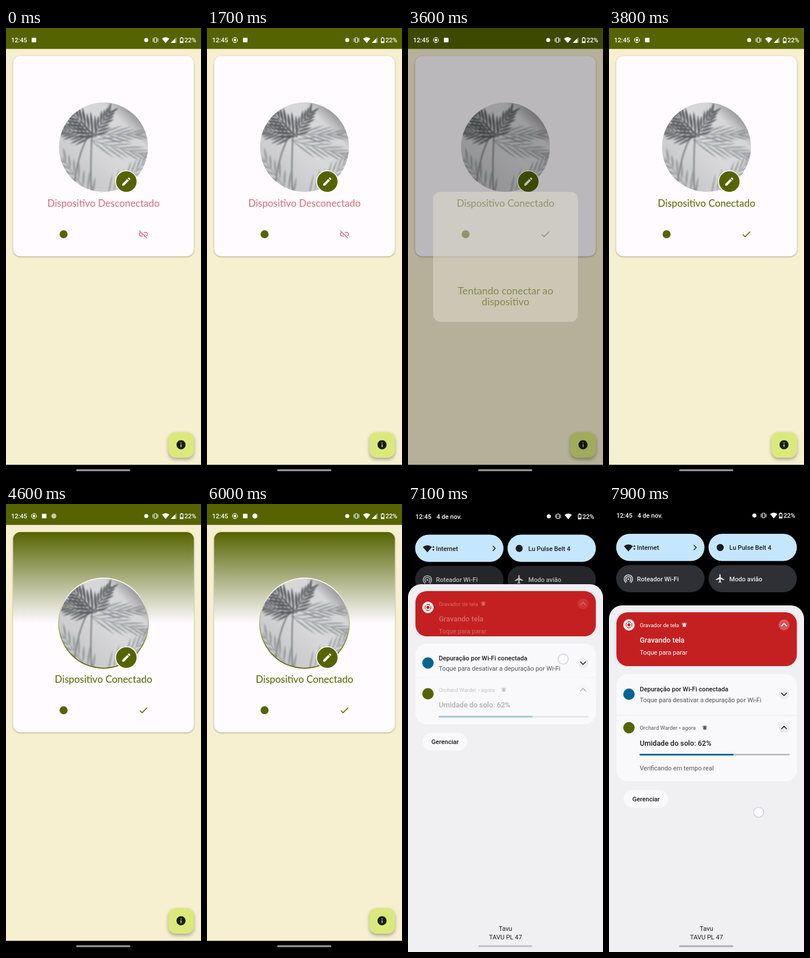
An HTML page for the animation above (8000 ms loop, 342 by 782 pixels).

```html
<!DOCTYPE html>
<html lang="pt-BR">
<head>
<meta charset="utf-8">
<title>Dispositivo</title>
<style>
  html, body { margin: 0; width: 100%; height: 100%; overflow: hidden; background: #000; }
  svg { display: block; }
  #stage { width: 342px; height: 782px; }
  text { font: 11.08px Roboto, sans-serif; white-space: pre; }
  .m { font-weight: 500; }
  .s { font-size: 9.5px; }
  .b { font-size: 12.67px; font-weight: 500; }
  .app { font: 400 17.2px Lato, sans-serif; text-anchor: middle; }
  .msg { font-size: 17.7px; }
  .c { text-anchor: middle; }
</style>
</head>
<body>
<svg id="stage" viewBox="0 0 342 782" xmlns="http://www.w3.org/2000/svg"></svg>
<script>
const LOOP = 8000, STEP = 100;
const OLIVE = '#556400', RED = '#d66c7a', INK = '#1b1c1f', TEAL = '#00658f';

const ICON = {
  pencil: 'M3 17.25V21h3.75L17.81 9.94l-3.75-3.75zM20.71 7.04a1 1 0 0 0 0-1.41l-2.34-2.34a1 1 0 0 0-1.41 0l-1.83 1.83 3.75 3.75z',
  info: 'M12 2C6.48 2 2 6.48 2 12s4.48 10 10 10 10-4.48 10-10S17.52 2 12 2zm1 15h-2v-6h2v6zm0-8h-2V7h2v2z',
  check: 'M9 16.17L4.83 12l-1.42 1.41L9 19 21 7l-1.41-1.41z',
  unlink: 'M17 7h-4v1.9h4c1.71 0 3.1 1.39 3.1 3.1 0 1.43-.98 2.63-2.31 2.98l1.46 1.46C20.88 15.61 22 13.95 22 12c0-2.76-2.24-5-5-5zm-1 4h-2.19l2 2H16zM2 4.27l3.11 3.11C3.29 8.12 2 9.91 2 12c0 2.76 2.24 5 5 5h4v-1.9H7c-1.71 0-3.1-1.39-3.1-3.1 0-1.59 1.21-2.9 2.76-3.07L8.73 11H8v2h2.73L13 15.27V17h1.73l4.01 4L20 19.74 3.27 3z',
  plane: 'M21 16v-2l-8-5V3.5a1.5 1.5 0 0 0-3 0V9l-8 5v2l8-2.5V19l-2 1.5V22l3.5-1 3.5 1v-1.5L13 19v-5.5z',
  bell: 'M12 22a2 2 0 0 0 2-2h-4a2 2 0 0 0 2 2zm6-6v-5c0-3.07-1.64-5.64-4.5-6.32V4a1.5 1.5 0 0 0-3 0v.68C7.63 5.36 6 7.92 6 11v5l-2 2v1h16v-1zM7.58 4.08L6.15 2.65A10.4 10.4 0 0 0 2.03 10.5h2a8.45 8.45 0 0 1 3.55-6.42zM19.97 10.5h2a10.5 10.5 0 0 0-4.12-7.85l-1.42 1.43a8.5 8.5 0 0 1 3.54 6.42z'
};

const icon = (name, x, y, size, fill) =>
  `<path d="${ICON[name]}" fill="${fill}" transform="translate(${x - size / 2} ${y - size / 2}) scale(${size / 24})"/>`;
const dot = (x, y, r, fill, more = '') => `<circle cx="${x}" cy="${y}" r="${r}" fill="${fill}" ${more}/>`;
const box = (x, y, w, h, r, fill, more = '') =>
  `<rect x="${x}" y="${y}" width="${w}" height="${h}" rx="${r}" fill="${fill}" ${more}/>`;
const label = (s, x, y, cls, fill) => `<text x="${x}" y="${y}" class="${cls}" fill="${fill}">${s}</text>`;
const line = (d, color, w) =>
  `<path d="${d}" fill="none" stroke="${color}" stroke-width="${w}" stroke-linecap="round" stroke-linejoin="round"/>`;
const group = (id, body, more = '') => `<g id="${id}" ${more}>${body}</g>`;

// dir: 1 points down, -1 points up
const chevron = (y, dir, color, back) =>
  dot(307, y, 9.5, back) + line(`M302.5 ${y - 2 * dir}l4.5 ${4.5 * dir}l4.5 ${-4.5 * dir}`, color, 1.5);

const record = (x, y, size, color) => `<g transform="translate(${x} ${y}) scale(${size})">
  ${dot(0, 0, 2.4, color)}
  <circle r="4.6" fill="none" stroke="${color}" stroke-width="1.2" stroke-dasharray="6.2 1.03" stroke-dashoffset="3.1"/></g>`;

const wifi = (x, y, k, color) =>
  `<path transform="translate(${x} ${y}) scale(${k})" d="M0 5.2L-6.4 -2.4Q0 -7.4 6.4 -2.4z" fill="${color}"/>`;

const status = id =>
  group(id + 'Left',
    dot(246, 21, 3.6, '#fff') +
    `<rect x="259.8" y="17" width="4.6" height="8" rx="1" fill="none" stroke="#fff" stroke-width="1.2"/>` +
    line('M257.7 18.5v5M266.5 18.5v5', '#fff', 1) +
    wifi(280, 21, 1, '#fff')) +
  group(id + 'Signal',
    '<path d="M299 16v10H289z" fill="#fff" opacity=".45"/><path d="M296.5 18.5V26H289z" fill="#fff"/>') +
  '<path d="M306.8 16.6h2.6M305.6 17.8h5v8h-5z" fill="none" stroke="#fff" stroke-width="1.1"/>' +
  box(306, 23.2, 4.2, 2.4, 0, '#fff') + label('22%', 313, 25, 'm', '#fff');

// Soft leaf shadows: a stem with leaflets on both sides
function blade(x, y, a, len, w) {
  const c = Math.cos(a), s = Math.sin(a);
  const side = k => `${(x + c * len / 2 - s * k).toFixed(1)} ${(y + s * len / 2 + c * k).toFixed(1)}`;
  return `M${x} ${y}Q${side(w)} ${(x + c * len).toFixed(1)} ${(y + s * len).toFixed(1)}Q${side(-w)} ${x} ${y}z`;
}
function frond(x0, y0, x1, y1, n, len, w, spread, color) {
  const a = Math.atan2(y1 - y0, x1 - x0);
  let d = '';
  for (let i = 0; i < n; i++) {
    const k = i / n, x = x0 + (x1 - x0) * k, y = y0 + (y1 - y0) * k;
    const size = len * (1 - .4 * k) * (.9 + .1 * Math.sin(i * 2.4));
    d += blade(x, y, a + spread * (1 - .5 * k), size, w) + blade(x, y, a - spread * (1 - .5 * k), size, w);
  }
  return `<path d="${d}" fill="${color}"/>` + line(`M${x0} ${y0}L${x1} ${y1}`, color, 1.6);
}
const photo = `<g clip-path="url(#round)">${box(92, 129, 158, 158, 0, 'url(#wall)')}
  <g filter="url(#soft)">
  ${frond(150, 298, 98, 226, 7, 44, 4, .8, '#9b9da0')}
  ${frond(178, 298, 246, 232, 7, 50, 3.4, .6, '#a3a5a8')}
  ${frond(148, 196, 246, 222, 6, 60, 2.6, .38, '#94969a')}
  ${frond(160, 186, 238, 186, 5, 54, 2.4, .34, '#8c8e92')}
  ${line('M152 172Q147 230 150 292M146 186Q124 220 118 290', '#808285', 2.4)}
  ${frond(152, 188, 94, 176, 8, 40, 4, .7, '#6c6e71')}
  ${frond(158, 190, 104, 138, 9, 42, 4.2, .75, '#595b5e')}
  ${frond(152, 188, 184, 144, 7, 32, 4, .7, '#646669')}
  </g></g>`;

const defs = `<defs>
  <clipPath id="round"><circle cx="171" cy="208" r="78"/></clipPath>
  <filter id="soft"><feGaussianBlur stdDeviation="1.1"/></filter>
  <linearGradient id="wall" x1="0" y1="1" x2="1" y2="0"><stop offset=".15" stop-color="#c6c6c8"/>
    <stop offset=".5" stop-color="#d8d8da"/><stop offset=".74" stop-color="#d6d6d8"/><stop offset=".87" stop-color="#8f8f91"/></linearGradient>
  <linearGradient id="fade" x1="0" y1="0" x2="0" y2="1"><stop offset="0" stop-color="${OLIVE}"/>
    <stop offset="1" stop-color="${OLIVE}" stop-opacity="0"/></linearGradient>
  <linearGradient id="edge" x1="0" y1="0" x2="0" y2="1"><stop offset=".1" stop-color="#fff"/>
    <stop offset=".9" stop-color="${OLIVE}"/></linearGradient>
</defs>`;

const app =
  box(0, 0, 342, 782, 0, '#f7f0d0') + box(0, 0, 342, 36.5, 0, OLIVE) +
  box(12.5, 49, 317, 349.5, 12.5, '#fffbff', 'style="filter:drop-shadow(0 1px 1.5px #0005)"') +
  group('glow', '<path d="M12.5 208V61.5a12.5 12.5 0 0 1 12.5-12.5h292a12.5 12.5 0 0 1 12.5 12.5v146.5z" fill="url(#fade)"/>') +
  photo +
  group('ring', '<circle cx="171" cy="208" r="78.6" fill="none" stroke="url(#edge)" stroke-width="1.7"/>') +
  dot(211, 268, 18.8, OLIVE, 'stroke="#fff" stroke-width="1.6"') + icon('pencil', 211, 268, 19, '#fff') +
  dot(101, 360, 7, OLIVE) +
  group('off', label('Dispositivo Desconectado', 171, 312, 'app', RED) + icon('unlink', 241, 360, 19, RED)) +
  group('on', label('Dispositivo Conectado', 171, 312, 'app', OLIVE) + icon('check', 241, 360, 19, OLIVE)) +
  box(285, 705.5, 44.5, 44.5, 12.5, '#dbe97c', 'style="filter:drop-shadow(0 3px 3px #0005)"') +
  icon('info', 307, 727.5, 19, '#1a1e00') +
  group('dim', box(0, 0, 342, 763, 0, '#000')) +
  group('dialog', box(44, 286, 254, 227, 13, '#e2decf') +
    label('Tentando conectar ao', 171, 465, 'app msg', OLIVE) + label('dispositivo', 171, 484, 'app msg', OLIVE)) +
  box(0, 762.5, 342, 19.5, 0, '#000') + box(123, 770.3, 95, 3.2, 1.6, '#999') +
  label('12:45', 9, 25, 'm', '#fff') +
  group('rec', record(49, 21, .95, '#fff')) +
  group('debug', box(45, 17, 8, 8, 1, '#fff')) +
  group('plant', dot(84, 21, 4.4, '#fff')) +
  status('bar');

const tile = (x, y, text, on, art) =>
  box(x, y, 155, 47.5, 23.7, on ? '#c5e6ff' : '#2e3035') + art +
  label(text, x + 36.5, y + 28, 'm', on ? INK : '#e8eaee');

const hotspot = dot(34, 131, 1.6, '#e8eaee') +
  line('M31.4 134.6a4.4 4.4 0 1 1 5.2 0M29.6 136.8a7.3 7.3 0 1 1 8.8 0', '#e8eaee', 1.5);

const bar = (y, end, fill) => line(`M55 ${y}H${end}`, '#bfbfc2', 3) + line(`M55 ${y}H${fill}`, TEAL, 3);

// Clipped notification card; square names the end without round corners
const card = (id, fill, body, square) =>
  `<svg id="${id}" width="342"><rect x="13" width="316.5" height="100%" rx="20" fill="${fill}"/>` +
  (square === 'bottom' ? box(13, 21, 316.5, 200, 0, fill) : '') +
  (square === 'top' ? box(13, 0, 316.5, 21, 0, fill) : '') +
  body + '</svg>';

const SOFT = '#eeeef1', PALE = '#f9f9fb', GREY = '#55565a';
const redCard = card('red', '#c42021',
  group('redIcon', dot(35, 0, 10, '#fff') + record(35, 0, 1.15, '#c42021')) +
  group('redOld', label('Gravando tela', 54, 30, 'm', '#fff') + icon('bell', 132, 26, 10, '#fff') +
    label('Toque para parar', 54, 49, '', '#fff') + chevron(36, 1, '#fff', '#fff4')) +
  group('redNew', label('Gravador de tela', 54, 26, 's', '#fff') + icon('bell', 132, 22, 10, '#fff') +
    label('Gravando tela', 54, 53, 'b', '#fff') + label('Toque para parar', 54, 74, '', '#fff') +
    chevron(22, -1, '#fff', '#fff4')));

const debugCard = card('wifi', PALE,
  group('wifiBody', dot(35, 35, 10, TEAL) + label('Depuração por Wi-Fi conectada', 54, 30, 'm', INK) +
    label('Toque para desativar a depuração por Wi-Fi', 54, 48.5, '', GREY) + chevron(35, 1, INK, SOFT)), 'bottom');

const soilCard = card('soil', PALE,
  group('soilIcon', dot(35, 0, 10, OLIVE)) +
  group('soilOld', label('Umidade do solo: 62%', 54, 30, 'm', INK) + label('• agora', 167, 30, 's', GREY) +
    icon('bell', 207, 27, 10, GREY) + bar(45, 284, 197) + chevron(35, 1, INK, SOFT)) +
  group('soilNew', label('Orchard Warder • agora', 54, 24.5, 's', GREY) + icon('bell', 168, 21, 10, GREY) +
    label('Umidade do solo: 62%', 54, 52, 'b', INK) + bar(68, 315.5, 217) +
    label('Verificando em tempo real', 54, 95, '', GREY) + chevron(21, -1, INK, SOFT)), 'top');

const shade = group('shade',
  box(0, 0, 342, 782, 0, '#000') +
  group('top',
    label('12:45', 13, 24, 'm', '#fff') + label('4 de nov.', 50, 24, 'm', '#fff') +
    `<g transform="translate(-7 -1)">${status('pull')}</g>` +
    tile(12.5, 52, 'Internet', true, wifi(34, 76.5, 1.25, INK) +
      `<path d="M42.5 74.5l2-3 2 3zM42.5 77.5l2 3 2-3z" fill="${INK}"/>` + line('M149 72l4 4-4 4', INK, 1.5)) +
    tile(174.5, 52, 'Lu Pulse Belt 4', true, dot(195, 76, 6.2, INK)) +
    group('row2', tile(12.5, 106.5, 'Roteador Wi-Fi', false, hotspot) +
      tile(174.5, 106.5, 'Modo avião', false, icon('plane', 195, 130, 18, '#e8eaee')))) +
  group('sheet', box(0, 177, 342, 800, 23, '#f0eff2')) +
  group('list', redCard + debugCard + soilCard +
    group('manage', box(25.5, 499, 78.5, 31, 15.5, PALE) + label('Gerenciar', 65, 518.5, 'm c', INK))) +
  label('Tavu', 171, 744.5, 'c', INK) + label('TAVU PL 47', 171, 759.5, 'c', INK) +
  box(123, 770.3, 95, 3.2, 1.6, '#f9f9fa') + group('grip', box(123, 770.3, 95, 3.2, 1.6, '#b0b0b2')));

const touch = '<circle id="touch" r="8.8" fill="#fffb" stroke="#c6c2dc" stroke-width="1.1"/>';

document.getElementById('stage').innerHTML = defs + app + shade + touch;

// Timed tracks: id, property, [time, value] points
const TRACKS = [
  ['debug', 'tx', [[0, 0], [500, 18]]],
  ['rec', 'opacity', [[100, 0], [600, 1]]],
  ['touch', 'opacity', [[2700, 0], [2800, 1], [2900, 1], [3000, 0], [6300, 0], [6400, .3], [6700, .3], [7000, 1]]],
  ['touch', 'tx', [[3000, 245.5], [6400, 287], [6700, 277], [7900, 262.5]]],
  ['touch', 'ty', [[3000, 366], [6400, 30], [6700, 137], [7900, 538]]],
  ['dim', 'opacity', [[2900, 0], [3200, .4], [3500, .4], [3800, 0]]],
  ['dialog', 'opacity', [[2900, 0], [3200, 1], [3500, 1], [3700, 0]]],
  ['off', 'opacity', [[3400, 1], [3500, 0]]],
  ['on', 'opacity', [[3400, 0], [3500, 1]]],
  ['glow', 'opacity', [[4100, 0], [4300, 1]]],
  ['ring', 'opacity', [[4100, 0], [4300, 1]]],
  ['plant', 'opacity', [[4400, 0], [4700, 1]]],
  ['shade', 'opacity', [[6300, 0], [6400, .2], [6600, .85], [6700, 1]]],
  ['list', 'opacity', [[6400, 0], [6700, .45], [7100, 1]]],
  ['row2', 'opacity', [[6700, 0], [7200, 1]]],
  ['grip', 'opacity', [[6800, 0], [7200, 1]]],
  ...['red', 'soil'].flatMap(n => [
    [n + 'Old', 'opacity', [[6800, 1], [7100, 0]]],
    [n + 'New', 'opacity', [[7000, 0], [7300, 1]]]
  ])
];

// Parts that follow the pull: id, property, value when short, value when open
const PULL = [[6400, -.4], [6700, 0], [7300, .75], [7900, 1]];
const FOLLOW = [
  ['top', 'ty', 3, 0], ['sheet', 'ty', -74, 0],
  ['pullLeft', 'tx', 0, 16], ['pullSignal', 'opacity', 1, -2],
  ['red', 'y', 115, 189], ['red', 'height', 64, 94], ['redIcon', 'ty', 35, 22],
  ['wifi', 'y', 190, 297], ['wifi', 'height', 47, 71], ['wifiBody', 'ty', -2, 0],
  ['soil', 'y', 237, 369.5], ['soil', 'height', 48.5, 114.5], ['soilIcon', 'ty', 35, 21],
  ['manage', 'ty', -199, 0]
];

function at(points, t) {
  if (t <= points[0][0]) return points[0][1];
  for (let i = 1; i < points.length; i++) {
    const [t0, v0] = points[i - 1], [t1, v1] = points[i];
    if (t <= t1) return v0 + (v1 - v0) * (t - t0) / (t1 - t0);
  }
  return points[points.length - 1][1];
}

const parts = {};
function put(id, prop, v) {
  const p = parts[id] || (parts[id] = { el: document.getElementById(id), tx: 0, ty: 0 });
  if (prop === 'tx' || prop === 'ty') {
    p[prop] = v;
    p.el.setAttribute('transform', `translate(${p.tx} ${p.ty})`);
  } else {
    p.el.setAttribute(prop, prop === 'opacity' ? Math.min(1, Math.max(0, v)) : v);
  }
}

function draw(t) {
  for (const [id, prop, points] of TRACKS) put(id, prop, at(points, t));
  const k = at(PULL, t);
  for (const [id, prop, a, b] of FOLLOW) put(id, prop, a + (b - a) * k);
}

const start = performance.now();
function tick() {
  const t = (performance.now() - start) % LOOP;
  draw(Math.floor(t / STEP) * STEP);
  requestAnimationFrame(tick);
}
tick();
</script>
</body>
</html>
```
